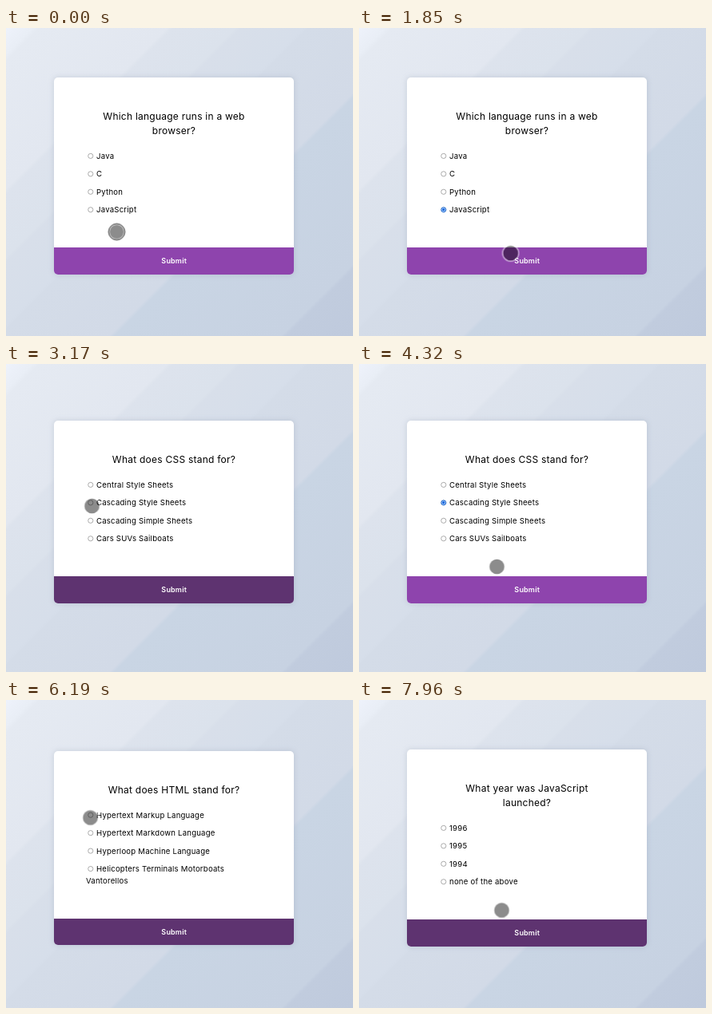
Animation, 434 px wide and 386 px high, one loop 8000 ms. Source, as an HTML page:

```html
<!DOCTYPE html>
<html lang="en">
<head>
<meta charset="utf-8">
<title>Quiz</title>
<style>
html, body { margin: 0; width: 100%; height: 100%; overflow: hidden; }
body {
  background: linear-gradient(135deg,
    #eef2fb 0, #e9eef6 4%, #e5eaf2 5%, #e2e7f0 24.6%,
    #dde3ed 25.4%, #dbe2ec 35%, #d8dfea 35.8%, #d6deea 45.4%,
    #d4dce8 46%, #d2dae7 62.8%, #c9d5e4 63.6%, #c7d2e2 89%,
    #c1ccde 89.8%, #bfcadd 100%);
}
svg { position: absolute; left: 0; top: 0; display: block; }
text { font-family: Inter, "Open Sans", sans-serif; fill: #000; }
.title { font-size: 12px; letter-spacing: .02em; text-anchor: middle; }
.item { font-size: 9.6px; letter-spacing: .022em; }
.submit { font-size: 9px; font-weight: 600; letter-spacing: .02em; text-anchor: middle; fill: #fff; }
.box { fill: #fff; filter: drop-shadow(0 0 3.5px rgba(90, 105, 130, .2)); }
.radio { fill: #fff; stroke: #767676; stroke-width: .6; }
.on circle { fill: #fff; stroke: #0b63dc; stroke-width: 1; }
.on circle + circle { fill: #0b63dc; stroke: none; }

.card, .on, .button, .cursor, .press { animation: 8s infinite step-end; }
.card, .on { opacity: 0; }
.button { fill: #8e44ad; animation-name: hover; }
#card0 { animation-name: card0; }
#card1 { animation-name: card1; }
#card2 { animation-name: card2; }
#card3 { animation-name: card3; }
#card0 .on { animation-name: pick0; }
#card1 .on { animation-name: pick1; }
#card2 .on { animation-name: pick2; }
.cursor { animation-name: move; animation-timing-function: ease-in-out; }
.press { animation-name: press; }

@keyframes card0 { 0% { opacity: 1 } 28.625%, 100% { opacity: 0 } }
@keyframes card1 { 0% { opacity: 0 } 28.625% { opacity: 1 } 60.625%, 100% { opacity: 0 } }
@keyframes card2 { 0% { opacity: 0 } 60.625% { opacity: 1 } 94%, 100% { opacity: 0 } }
@keyframes card3 { 0% { opacity: 0 } 94%, 100% { opacity: 1 } }
@keyframes pick0 { 0% { opacity: 0 } 18.75%, 100% { opacity: 1 } }
@keyframes pick1 { 0% { opacity: 0 } 44%, 100% { opacity: 1 } }
@keyframes pick2 { 0% { opacity: 0 } 81.875%, 100% { opacity: 1 } }

@keyframes hover {
  0%, 49.625%, 81.875%, 94% { fill: #8e44ad }
  24.25%, 54.125%, 90.75%, 95.125%, 100% { fill: #5e3370 }
}
@keyframes press {
  0%, 17.75%, 27.625%, 42.875%, 59.5%, 80.75%, 92.875% { opacity: 1 }
  1.125%, 18.75%, 28.625%, 45.125%, 60.625%, 81.875%, 94%, 100% { opacity: 0 }
}
@keyframes move {
  0%, 6% { transform: translate(138.5px, 255.5px) }
  15.5%, 19.9% { transform: translate(106.5px, 226.5px) }
  19.9% { animation-timing-function: ease-in }
  23.1% { transform: translate(189.5px, 282px); animation-timing-function: ease-out }
  26.5%, 31% { transform: translate(196.5px, 291.5px) }
  39.6%, 42% { transform: translate(107.5px, 178px) }
  43%, 47.5% { transform: translate(108.5px, 177px) }
  58.375%, 64% { transform: translate(204.5px, 292.5px) }
  75.1%, 76% { transform: translate(106px, 153px) }
  77.375%, 79.6% { transform: translate(105.5px, 147.5px) }
  80.75%, 83% { transform: translate(106.5px, 146px) }
  89.625% { transform: translate(191.5px, 282px); animation-timing-function: ease-out }
  91.75%, 97.25% { transform: translate(199px, 294px) }
  99.5%, 100% { transform: translate(178.5px, 263.5px) }
}
</style>
</head>
<body>
<svg width="434" height="386" viewBox="0 0 434 386">
  <g id="cards"></g>
  <g class="cursor">
    <circle r="9.5" fill="#000" fill-opacity=".45"/>
    <circle r="10.1" fill="none" stroke="#fff" stroke-opacity=".5" stroke-width="1.6"/>
    <g class="press" fill="none">
      <circle r="9.4" stroke="#fff"/>
      <circle r="10.1" stroke="#000" stroke-width=".9"/>
    </g>
  </g>
</svg>
<script>
const quiz = [
  { title: ["Which language runs in a web", "browser?"],
    items: ["Java", "C", "Python", "JavaScript"], pick: 3 },
  { title: ["What does CSS stand for?"],
    items: ["Central Style Sheets", "Cascading Style Sheets", "Cascading Simple Sheets", "Cars SUVs Sailboats"], pick: 1 },
  { title: ["What does HTML stand for?"],
    items: ["Hypertext Markup Language", "Hypertext Markdown Language", "Hyperloop Machine Language", "Helicopters Terminals Motorboats"],
    wrap: "Vantorellos", pick: 0 },
  { title: ["What year was JavaScript", "launched?"],
    items: ["1996", "1995", "1994", "none of the above"] }
];

const text = (kind, x, y, s) => `<text class="${kind}" x="${x}" y="${Math.round(y)}">${s}</text>`;

function card({ title, items, wrap, pick }, n) {
  const body = 177.2 + 18 * title.length + (wrap ? 14.4 : 0);
  const half = (body + 33.4) / 2;
  const start = 185.5 - half;
  const [top, foot, end] = [start, start + body, 185.5 + half].map(Math.round);
  const itemY = i => start + 62.2 + 18 * title.length + 22.45 * i;

  let out = `<rect class="box" x="60" y="${top}" width="300" height="${end - top}" rx="5"/>`;
  out += `<path class="button" d="M60 ${foot}H360V${end - 5}a5 5 0 0 1-5 5H65a5 5 0 0 1-5-5z"/>`;
  title.forEach((s, i) => out += text("title", 210, start + 53.2 + 18 * i, s));
  items.forEach((s, i) => {
    const y = itemY(i);
    out += `<circle class="radio" cx="105.8" cy="${y}" r="3.1"/>` + text("item", 113, y + 3.5, s);
  });
  if (wrap) out += text("item", 100, itemY(3) + 18.5, wrap);
  if (pick !== undefined) {
    const at = `cx="105.8" cy="${itemY(pick)}"`;
    out += `<g class="on"><circle ${at} r="2.9"/><circle ${at} r="1.8"/></g>`;
  }
  out += text("submit", 210.2, foot + 20, "Submit");
  return `<g class="card" id="card${n}">${out}</g>`;
}

document.getElementById("cards").innerHTML = quiz.map(card).join("");
</script>
</body>
</html>
```
